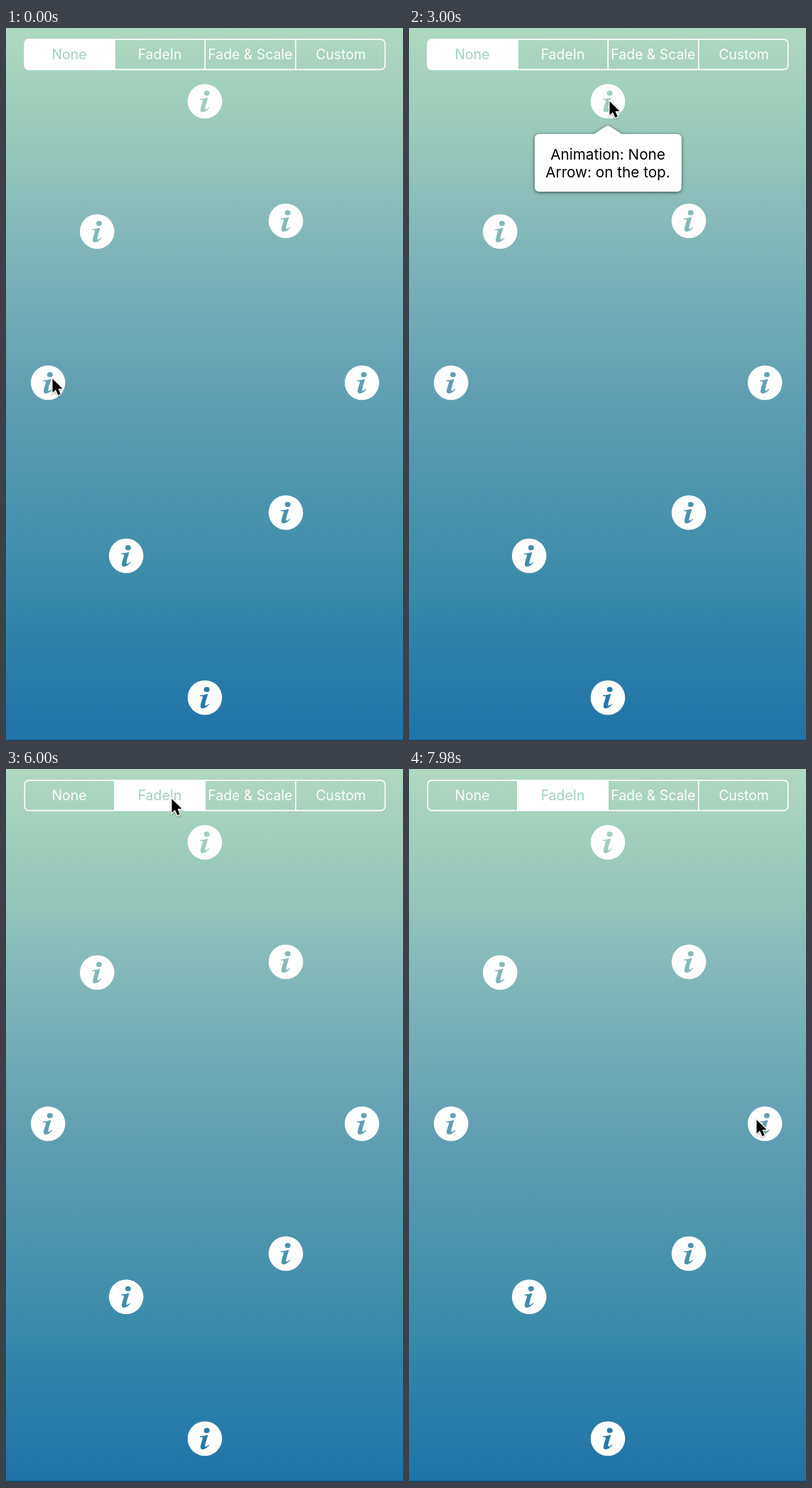
Recreate the animation shown at these times as an HTML page. Size 559 by 1002 pixels, loop 8000 ms.

```html
<!DOCTYPE html>
<html lang="en">
<head>
<meta charset="utf-8">
<title>Tooltip arrows</title>
<style>
  html, body { margin: 0; width: 100%; height: 100%; overflow: hidden; }
  svg { display: block; width: 100vw; height: 100vh; }
  text { font-family: Inter, Roboto, sans-serif; }
  .tabs text { font-size: 19.4px; text-anchor: middle; fill: #fff; }
  .tabs .on { fill: #a3d0be; }
  .tip { opacity: 0; }
  .tip path { fill: #fff; filter: drop-shadow(0 1px 2.5px rgba(0, 0, 0, .6)); }
  .tip text { font-size: 20.7px; fill: #000; }
  .mid { text-anchor: middle; }
  #cursor path { filter: drop-shadow(0 1px 1px rgba(0, 0, 0, .35)); }
</style>
</head>
<body>
<svg viewBox="0 0 559 1002" preserveAspectRatio="none">
  <defs>
    <linearGradient id="sky" x1="0" y1="0" x2="0" y2="1">
      <stop offset="0" stop-color="#afd8c0"/>
      <stop offset=".19" stop-color="#93c5b9"/>
      <stop offset=".23" stop-color="#8cbeba"/>
      <stop offset=".5" stop-color="#62a0b2"/>
      <stop offset=".8" stop-color="#3989aa"/>
      <stop offset=".83" stop-color="#3384ab"/>
      <stop offset="1" stop-color="#1f73a7"/>
    </linearGradient>
    <clipPath id="bar"><rect x="25.5" y="15" width="509" height="44" rx="6.5"/></clipPath>
    <path id="info" fill="#fff" fill-rule="evenodd" d="
      M-24.3 0A24.3 24.3 0 1 1 24.3 0A24.3 24.3 0 1 1 -24.3 0Z
      M-1.3 -11.3A4 3.6 0 1 1 6.7 -11.5A4 3.6 0 1 1 -1.3 -11.3Z
      M-7 -3.2C-3.5 -3.4 0 -4.1 3.9 -5.3L4.2 -4.8C3 0 .4 7 .3 10
      C.3 12.2 3 11.2 5.5 8.5L6.3 9.3C3 13.3 -.5 15.4 -3.5 15.2
      C-6 15 -6.6 12.8 -6 10C-5.2 6 -3.6 2 -3 -.5C-2.7 -2 -4 -2.3 -7 -2Z"/>
  </defs>

  <rect width="559" height="1002" fill="url(#sky)"/>
  <rect y="1000.5" width="559" height="1.5" fill="#143f5c"/>

  <g class="tabs">
    <g clip-path="url(#bar)" fill="#fff">
      <rect id="fillA" x="25" y="15" width="128.5" height="44"/>
      <rect id="fillB" x="152" y="15" width="128.5" height="44" opacity="0"/>
    </g>
    <rect x="26.3" y="15.8" width="507.4" height="42.6" rx="6" fill="none" stroke="#fff" stroke-width="1.7"/>
    <path d="M153 16V58M280.2 16V58M407.8 16V58" stroke="#fff" stroke-width="1.7"/>
    <text id="labelA" class="on" x="89" y="44">None</text>
    <text id="labelB" x="216.5" y="44">FadeIn</text>
    <text x="343.8" y="44">Fade &amp; Scale</text>
    <text x="471.5" y="44">Custom</text>
  </g>

  <g id="icons"></g>

  <g id="tipLeft" class="tip">
    <path d="M111 458.5H292a6 6 0 0 1 6 6V533.8a6 6 0 0 1 -6 6H111a6 6 0 0 1 -6 -6V517L94 500.5Q92.8 498.5 94 496.5L105 480V464.5a6 6 0 0 1 6 -6Z"/>
    <text x="120.5" y="494">Animation: None</text>
    <text x="120.5" y="519">Arrow: left side.</text>
  </g>
  <g id="tipTop" class="tip">
    <path d="M183 149H260.5L278 137.8Q280 136.6 282 137.8L299.5 149H377.8a6 6 0 0 1 6 6V224a6 6 0 0 1 -6 6H183a6 6 0 0 1 -6 -6V155a6 6 0 0 1 6 -6Z"/>
    <text class="mid" x="280" y="184.5">Animation: None</text>
    <text class="mid" x="280" y="209.5">Arrow: on the top.</text>
  </g>

  <g id="cursor">
    <path d="M1.5 3V22.5L6 18.3L9.3 26L12.8 24.5L9.5 17L15.5 16.8Z" fill="#000" stroke="#fff" stroke-width="2.6" paint-order="stroke"/>
  </g>
</svg>
<script>
  const LOOP = 8000;
  const $ = id => document.getElementById(id);

  const spots = [[280, 103], [394, 271], [128.3, 286], [59.2, 498.5],
                 [501.2, 498.5], [394, 681], [169.2, 741.8], [280, 941]];
  for (const [x, y] of spots) {
    const use = document.createElementNS("http://www.w3.org/2000/svg", "use");
    use.setAttribute("href", "#info");
    use.setAttribute("transform", `translate(${x} ${y})`);
    $("icons").append(use);
  }

  const play = (id, frames) =>
    $(id).animate(frames, { duration: LOOP, iterations: Infinity }).startTime = 0;

  // Hard switches: [ms, value] pairs
  const hold = (id, prop, steps) => play(id, [...steps, [LOOP, steps.at(-1)[1]]].map(
    ([t, v]) => ({ offset: t / LOOP, [prop]: v, easing: "step-end" })));

  const PICK = 5520;
  hold("tipLeft", "opacity", [[0, 0], [20, 1], [1080, 0]]);
  hold("tipTop", "opacity", [[0, 0], [3000, 1], [4060, 0]]);
  hold("fillA", "opacity", [[0, 1], [PICK, 0]]);
  hold("fillB", "opacity", [[0, 0], [PICK, 1]]);
  hold("labelA", "fill", [[0, "#a3d0be"], [PICK, "#fff"]]);
  hold("labelB", "fill", [[0, "#fff"], [PICK, "#a3d0be"]]);

  // Pointer: ms, x, y, easing towards the next point
  const start = "cubic-bezier(.45, 0, .8, .8)", stop = "cubic-bezier(.15, .5, .4, 1)";
  const route = [
    [0, 64, 490], [1800, 64, 490, start], [2060, 264, 154, stop], [2540, 281, 100],
    [4680, 281, 100, start], [5000, 252, 64, stop], [5460, 232, 39],
    [6440, 232, 39, start], [6660, 383, 205, stop], [7240, 488, 490], [LOOP, 488, 490]
  ];
  play("cursor", route.map(([t, x, y, easing = "linear"]) =>
    ({ offset: t / LOOP, transform: `translate(${x}px, ${y}px)`, easing })));
</script>
</body>
</html>
```
